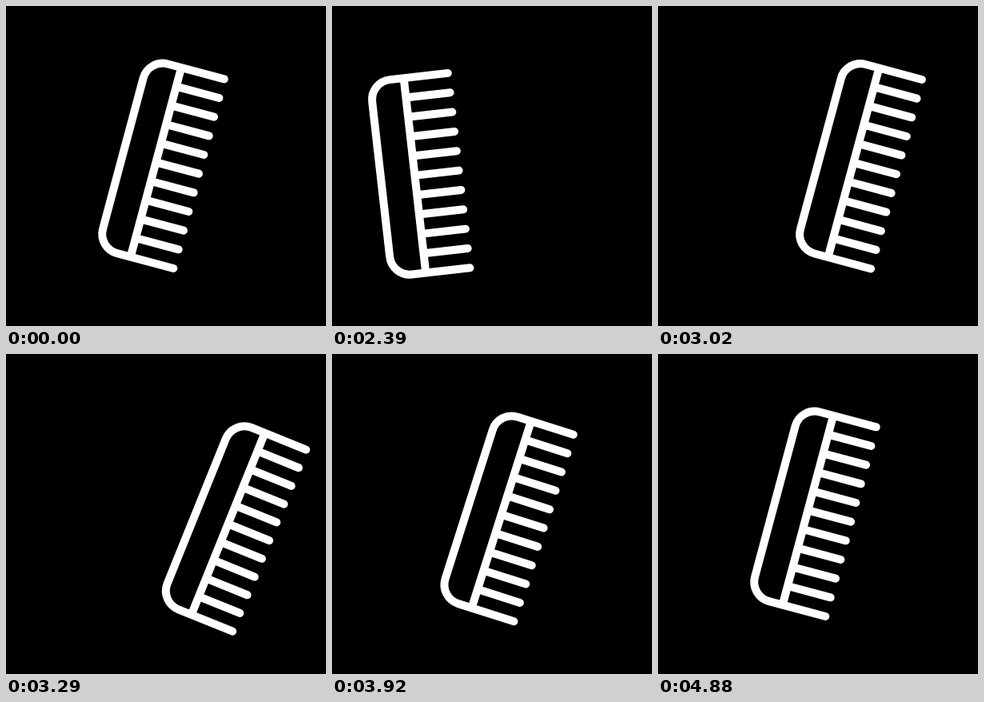
Write an HTML page that moves like this. It is 400 px wide and 400 px high and loops after 5060 ms.

```html
<!DOCTYPE html>
<html>
<head>
<meta charset="utf-8">
<style>
html, body { margin: 0; height: 100%; overflow: hidden; background: #000; }
svg { display: block; width: 100%; height: 100%; }
path { fill: none; stroke: #fff; stroke-width: 10; stroke-linecap: round; }
</style>
</head>
<body>
<svg viewBox="0 0 400 400"><path id="comb"/></svg>
<script>
const LOOP = 5060, STEP = 30;
const comb = document.getElementById('comb');

// Key poses of the comb's centre: time, x, y, angle
const poses = [
  [1995, 193.7, 197, 15],
  [2490, 100, 212.8, -10.2],
  [2540, 103.8, 210.8, -10.8],
  [2780, 169.7, 186, 0.6],
  [2850, 193.5, 184.4, 5],
  [3020, 250.7, 197.5, 15.1],
  [3080, 262.3, 202.2, 17],
  [3390, 287, 217, 23.2],
  [3620, 273.3, 215.6, 23.9],
  [4160, 184.8, 194.3, 11],
  [4370, 183, 194.2, 8],
  [4700, 192, 196.5, 14],
  [4880, 193.7, 197, 15]
];

function combPath() {
  let d = 'M49-122.5H-24A25 25 0 0 0-49-97.5V97.5A25 25 0 0 0-24 122.5H49M-6.5-122.5V122.5';
  for (let i = 1; i < 10; i++) d += `M-6.5 ${-122.5 + i * 24.5}H49`;
  return d;
}

const secant = (i, c) => (poses[i + 1][c] - poses[i][c]) / (poses[i + 1][0] - poses[i][0]);

// Monotone slope: flat at the ends and at turning points
function slope(i, c) {
  if (i === 0 || i === poses.length - 1) return 0;
  const a = secant(i - 1, c), b = secant(i, c);
  if (a * b <= 0) return 0;
  const before = poses[i][0] - poses[i - 1][0], after = poses[i + 1][0] - poses[i][0];
  const wa = 2 * after + before, wb = after + 2 * before;
  return (wa + wb) / (wa / a + wb / b);
}

function valueAt(t, c) {
  const i = poses.findIndex((p, k) => k && t <= p[0]) - 1;
  const p = poses[i], q = poses[i + 1], h = q[0] - p[0], u = (t - p[0]) / h, v = 1 - u;
  return v * v * ((1 + 2 * u) * p[c] + u * h * slope(i, c))
       + u * u * ((1 + 2 * v) * q[c] - v * h * slope(i + 1, c));
}

function draw(now) {
  const t = now % LOOP;
  const held = t < 2030 ? 1995 : Math.min(4880, t - (t - 2030) % STEP);
  const [x, y, angle] = [1, 2, 3].map(c => valueAt(held, c));
  comb.setAttribute('transform', `translate(${x} ${y}) rotate(${angle})`);
}

comb.setAttribute('d', combPath());
const start = performance.now();
function tick() {
  draw(performance.now() - start);
  requestAnimationFrame(tick);
}
tick();
</script>
</body>
</html>
```
